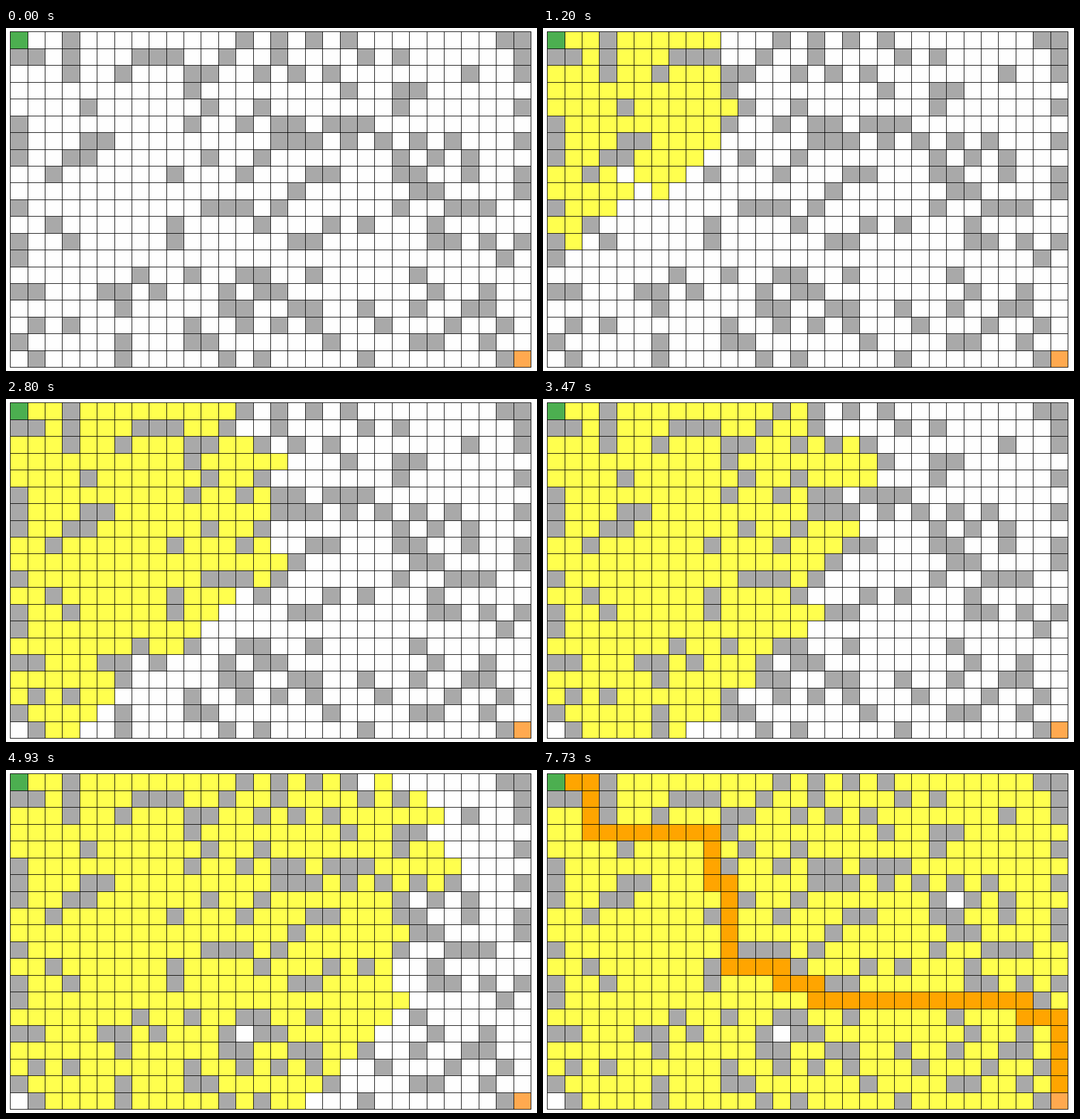
Animation of 930 by 602 pixels, one loop 8.59 s. Source, as an HTML page with a canvas:

```html
<!DOCTYPE html>
<html lang="en">
<head>
<meta charset="utf-8">
<title>Breadth-first search</title>
<style>
  html, body { margin: 0; width: 100%; height: 100%; overflow: hidden; background: #fefefe; }
  canvas { display: block; }
</style>
</head>
<body>
<canvas id="stage" width="930" height="602"></canvas>
<script>
const MAZE = [
  '...#.........#.#.#.#........##',
  '##.#...###..#..#....#.#......#',
  '...#..#...##..#.#.#.......#..#',
  '..........#........#..##......',
  '....#......#..#.......#......#',
  '#.........#..#.##.###.........',
  '#...##.........###.#.#.#.#...#',
  '#..##......#..#.......#.#.#...',
  '..#......#...#...##...##..#..#',
  '................#......##....#',
  '#..........###.#......#..###..',
  '..#......#....#...#.#...#.....',
  '#..#.....#......##......##.#.#',
  '#...........................#.',
  '.......#..#..##..#.....#......',
  '##...##.#...#.##........#..#..',
  '......#.....##..##..#..#..##..',
  '.#.#......#..#.#.#...#...#..#.',
  '#.....#...##......#....##..#..',
  '.#....#.....#.#.....#.......#.'
];
const COLS = 30, ROWS = 20, START = 0, END = COLS * ROWS - 1;
const COLOR = {
  open: '#fefefe', wall: '#a9a9a9', seen: '#ffff4e', path: '#ffa500',
  start: '#4caf50', end: '#ffa94f', line: '#000'
};
const LOOP = 8590, LAST_STEP = 116;

// [step, cells done], linear in between
const SEARCH = [[0, 0], [18, 80], [42, 185], [52, 233], [74, 334], [98, 436], [101, 445]];
const TRACE = [[102.6, 0], [104, 5], [116, 47]];

const ctx = document.getElementById('stage').getContext('2d');
const lineX = c => Math.floor(7.7 + 30.39 * c);
const lineY = r => Math.floor(6.94 + 29.44 * r);

// Neighbours are tried left, right, down, up.
function search() {
  const parent = new Map([[START, null]]);
  const queue = [START];
  for (const cell of queue) {
    const x = cell % COLS, y = Math.floor(cell / COLS);
    for (const [dx, dy] of [[-1, 0], [1, 0], [0, 1], [0, -1]]) {
      const nx = x + dx, ny = y + dy, next = ny * COLS + nx;
      if (MAZE[ny]?.[nx] !== '.' || parent.has(next)) continue;
      parent.set(next, cell);
      queue.push(next);
    }
  }
  const path = [];
  for (let cell = parent.get(END); cell !== START; cell = parent.get(cell)) path.unshift(cell);
  return { order: queue.filter(cell => cell !== START && cell !== END), path };
}

function progress(keys, step) {
  if (step <= keys[0][0]) return 0;
  for (let i = 1; i < keys.length; i++) {
    const [s0, n0] = keys[i - 1], [s1, n1] = keys[i];
    if (step <= s1) return Math.round(n0 + (n1 - n0) * (step - s0) / (s1 - s0));
  }
  return keys[keys.length - 1][1];
}

// 15 steps per second, each starting on a multiple of 10 ms
function stepAt(t) {
  let step = Math.ceil(t * 0.015);
  if (Math.round(step * 20 / 3) * 10 > t) step--;
  return Math.min(step, LAST_STEP);
}

function fillCell(cell, color) {
  const c = cell % COLS, r = Math.floor(cell / COLS);
  const x = lineX(c), y = lineY(r);
  ctx.fillStyle = color;
  ctx.fillRect(x, y, lineX(c + 1) - x, lineY(r + 1) - y);
}

function drawLines() {
  const left = lineX(0), top = lineY(0);
  const width = lineX(COLS) - left + 1, height = lineY(ROWS) - top + 1;
  ctx.fillStyle = COLOR.line;
  for (let c = 0; c <= COLS; c++) ctx.fillRect(lineX(c), top, 1, height);
  for (let r = 0; r <= ROWS; r++) ctx.fillRect(left, lineY(r), width, 1);
}

const { order, path } = search();

function draw(step) {
  ctx.fillStyle = COLOR.open;
  ctx.fillRect(0, 0, 930, 602);
  for (let cell = 0; cell <= END; cell++) {
    if (MAZE[Math.floor(cell / COLS)][cell % COLS] === '#') fillCell(cell, COLOR.wall);
  }
  order.slice(0, progress(SEARCH, step)).forEach(cell => fillCell(cell, COLOR.seen));
  path.slice(0, progress(TRACE, step)).forEach(cell => fillCell(cell, COLOR.path));
  fillCell(START, COLOR.start);
  fillCell(END, COLOR.end);
  drawLines();
}

const begin = performance.now();
function tick() {
  draw(stepAt((performance.now() - begin) % LOOP));
  requestAnimationFrame(tick);
}
tick();
</script>
</body>
</html>
```
